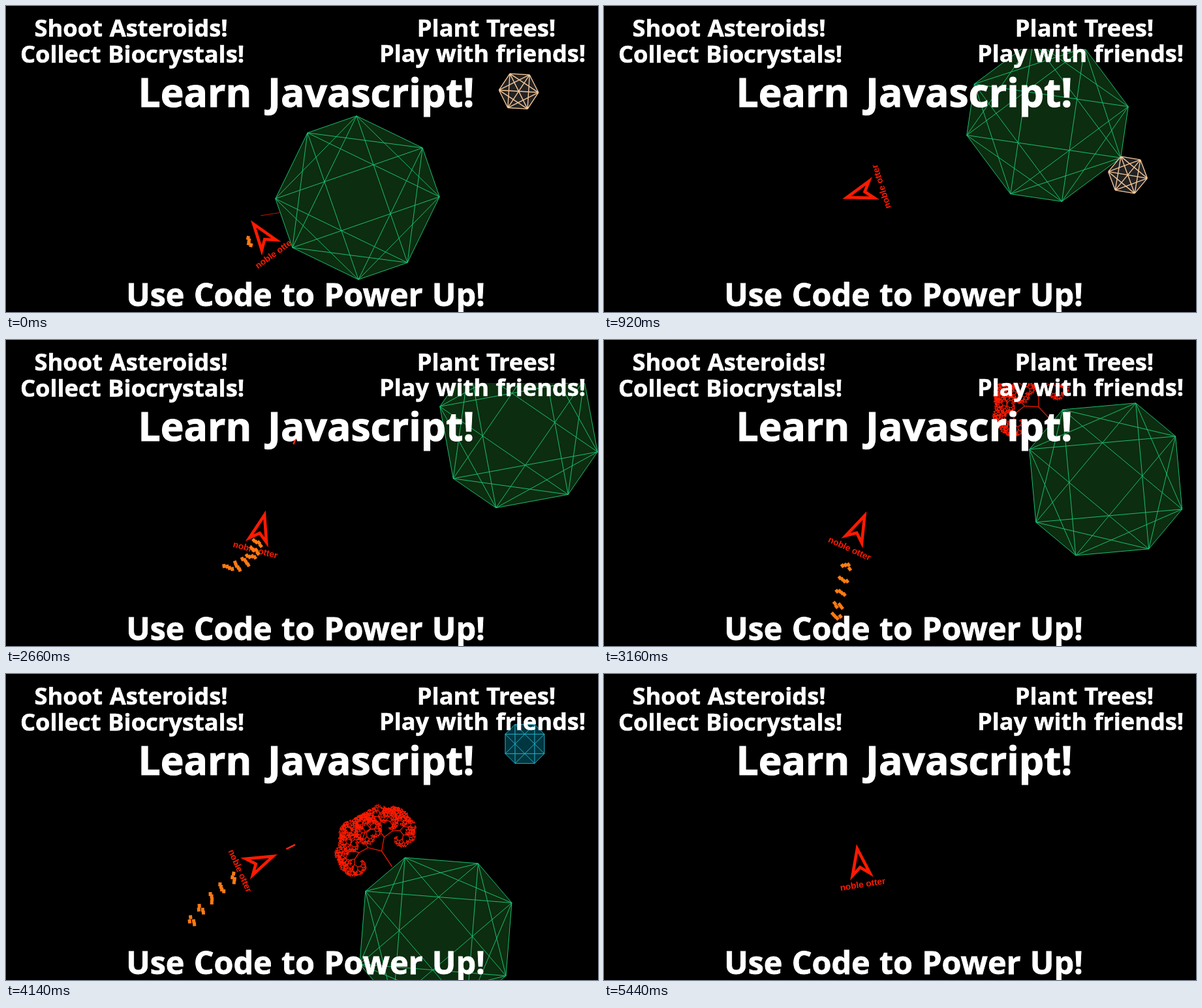
An HTML page with a canvas for the animation above (5460 ms loop, 907 px wide and 470 px high).

```html
<!DOCTYPE html>
<html lang="en">
<head>
<meta charset="utf-8">
<title>Space coding game</title>
<style>
  html, body { margin: 0; width: 100%; height: 100%; overflow: hidden; background: #000; }
  canvas { display: block; }
</style>
</head>
<body>
<canvas id="stage" width="907" height="470"></canvas>
<script>
const ctx = document.getElementById('stage').getContext('2d');
const LOOP = 5460, STEP = 20, TOP = 66, DEG = Math.PI / 180;
const RED = '#ff1a00', ORANGE = '#ff7a12';
const SHIP = { x: 391, y: 288 };
const TREE_FROM = 3080, ROCK_UNTIL = 2600, GEM_UNTIL = 5000;
const SHOTS = [2120, 2516, 4090];
const BURNS = [[2320, 3080], [3700, 4100], [4460, 4900]];

// Smooth, overshoot-free curve through a few points [time, ...values].
function curve(...rows) {
  const last = rows.length - 1;
  const slope = (i, k) => (rows[i + 1][k] - rows[i][k]) / (rows[i + 1][0] - rows[i][0]);
  function tangent(i, k) {
    if (i === 0) return slope(0, k);
    if (i === last) return slope(last - 1, k);
    const a = slope(i - 1, k), b = slope(i, k);
    return a * b <= 0 ? 0 : 2 * a * b / (a + b);
  }
  return t => {
    t = Math.min(Math.max(t, rows[0][0]), rows[last][0]);
    let i = 0;
    while (i < last - 1 && t > rows[i + 1][0]) i++;
    const p = rows[i], q = rows[i + 1], h = q[0] - p[0], u = (t - p[0]) / h, v = 1 - u;
    return p.slice(1).map((from, n) => {
      const k = n + 1;
      return from + (q[k] - from) * u * u * (3 - 2 * u)
        + h * u * v * (tangent(i, k) * v - tangent(i + 1, k) * u);
    });
  };
}

// The view follows the ship, so the planet's path carries everything else.
const path = curve([0, 538.5, 231.5], [920, 679.5, 176.5], [1800, 782.5, 116], [2660, 785.5, 137],
  [3720, 724.2, 334.6], [4580, 547.5, 451], [5040, 346, 482], [5440, 340, 692]);
const heading = curve([0, -36], [920, -107.6], [1800, -221.4], [2660, -345.4],
  [3720, -314.2], [4580, -279.7], [5440, -368.8]);
// The rock falls onto the planet, then rolls along its rim.
const rockOffset = curve([0, 247, -163.5], [560, 160, 0], [920, 123, 83], [1800, 90, 119]);

const settle = t => 63 * Math.max(0, 1 - t / 560) ** 2;
const turn = t => heading(t)[0] * DEG;
const planetSpin = t => -19.1 + 0.009 * t + 31.9 * (1 - Math.exp(-t / 1000));

function planetAt(t) {
  const [x, y] = path(t);
  return [x, y + settle(t)];
}

function noise(n) {
  const v = Math.sin(n * 127.1 + 3.7) * 43758.5453;
  return v - Math.floor(v);
}

// Polygon with chords joining corners the given numbers of steps apart.
function crystal(x, y, r, angles, steps, fill, line, width) {
  const points = angles.map(a => [x + r * Math.cos(a * DEG), y + r * Math.sin(a * DEG)]);
  ctx.beginPath();
  points.forEach(p => ctx.lineTo(...p));
  ctx.closePath();
  ctx.fillStyle = fill;
  ctx.fill();
  ctx.beginPath();
  points.forEach((p, i) => steps.forEach(d => {
    ctx.moveTo(...p);
    ctx.lineTo(...points[(i + d) % points.length]);
  }));
  ctx.strokeStyle = line;
  ctx.lineWidth = width;
  ctx.stroke();
}

const octagon = spin => [0, 90, 180, 270].flatMap(q => [spin + q - 18.435, spin + q + 18.435]);
const hexagon = spin => [0, 1, 2, 3, 4, 5].map(i => spin + i * 60);

function drawPlanet(t) {
  crystal(...planetAt(t), 125.7, octagon(planetSpin(t)), [1, 2, 3], '#0c2d0f', '#1bbd72', 1);
}

function drawRock(t) {
  const [px, py] = planetAt(t), [dx, dy] = rockOffset(t);
  crystal(px + dx, py + dy, 30.3, hexagon(3.4 + 0.0068 * t), [1, 2, 3], '#222', '#f5c69a', 1.4);
}

function drawGem(t) {
  const [px, py] = planetAt(t);
  crystal(px + 136.5, py - 278 - (4580 - t) * 0.03, 33.5, octagon(45), [1, 3], '#003640', '#22b4cc', 1);
}

// Binary tree growing along +x, with slightly uneven forks.
const treeShape = new Path2D();
function grow(x, y, len, dir, depth, id) {
  const ex = x + len * Math.cos(dir), ey = y + len * Math.sin(dir);
  treeShape.moveTo(x, y);
  treeShape.lineTo(ex, ey);
  if (depth === 0) return;
  for (const side of [0, 1]) {
    const child = id * 2 + side;
    const fork = (43 + (noise(child) - 0.5) * (depth > 9 ? 0 : 34)) * DEG;
    grow(ex, ey, len * 0.735, dir + (side ? fork : -fork), depth - 1, child);
  }
}
grow(0, 0, 29.3, 0, 11, 1);

function drawTree(t) {
  ctx.save();
  ctx.translate(...planetAt(t));
  ctx.rotate((planetSpin(t) - 172.7) * DEG);
  ctx.translate(122, 0);
  ctx.strokeStyle = RED;
  ctx.lineWidth = 1.2;
  ctx.stroke(treeShape);
  ctx.restore();
}

function drawShip(t) {
  ctx.save();
  ctx.translate(SHIP.x, SHIP.y + settle(t));
  ctx.rotate(turn(t));
  ctx.beginPath();
  [[0, -20], [13.5, 20], [0, 9], [-13.5, 20]].forEach(p => ctx.lineTo(...p));
  ctx.closePath();
  ctx.strokeStyle = RED;
  ctx.lineWidth = 4.6;
  ctx.stroke();
  ctx.fillStyle = RED;
  ctx.font = 'bold 13.6px "Liberation Sans", Arial, sans-serif';
  ctx.textAlign = 'center';
  ctx.fillText('noble otter', 0, 40);
  ctx.restore();
}

function puff(x, y, angle, seed) {
  ctx.save();
  ctx.translate(x, y);
  ctx.rotate(angle);
  ctx.fillStyle = ORANGE;
  for (let i = 0; i < 4; i++) {
    ctx.save();
    ctx.translate((i - 1.5) * 4, (noise(seed + i) - 0.5) * 7);
    ctx.rotate(0.6);
    ctx.fillRect(-3, -2.5, 6, 5);
    ctx.restore();
  }
  ctx.restore();
}

function drawExhaust(t) {
  const [px, py] = planetAt(t);
  for (const [from, to] of BURNS) {
    for (let born = from; born <= Math.min(to, t); born += 60) {
      const age = t - born;
      if (age > 360) continue;
      const [bx, by] = planetAt(born), a = turn(born), back = 16 + age * 0.16;
      puff(SHIP.x - Math.sin(a) * back + px - bx, SHIP.y + Math.cos(a) * back + py - by, a, born);
    }
  }
}

function line(x1, y1, x2, y2, color, width) {
  ctx.beginPath();
  ctx.moveTo(x1, y1);
  ctx.lineTo(x2, y2);
  ctx.strokeStyle = color;
  ctx.lineWidth = width;
  ctx.stroke();
}

function drawLasers(t) {
  for (const born of SHOTS) {
    const far = t - born + 8, a = turn(born);
    if (far < 30 || far > 490) continue;
    const at = d => [SHIP.x + Math.sin(a) * d, SHIP.y - Math.cos(a) * d];
    line(...at(far - 15), ...at(far), '#ff2a10', 2.4);
  }
}

// Last traces of a burn and a shot from before the loop begins.
function drawLeftovers(t) {
  puff(370 + t * 0.15, 363 - t * 0.25, 68 * DEG, 5);
  if (t < 60) line(390, 322, 419, 317.5, '#c01404', 1.2);
}

// Text, centre, baseline, size, extra word gap in em.
const TITLES = [
  ['Shoot Asteroids!', 191.5, 47, 36.3, 0.035],
  ['Collect Biocrystals!', 193.5, 87, 36.3, 0.035],
  ['Plant Trees!', 736, 47, 36.3, 0.035],
  ['Play with friends!', 730, 86, 36.1, 0.035],
  ['Learn Javascript!', 460, 155, 60.5, 0.15],
  ['Use Code to Power Up!', 459, 461, 48.4, 0.035]
];

function drawTitles() {
  ctx.fillStyle = ctx.strokeStyle = '#fff';
  ctx.textAlign = 'center';
  for (const [text, x, y, size, gap] of TITLES) {
    ctx.font = `bold ${size}px "Noto Sans", "Open Sans", sans-serif`;
    ctx.wordSpacing = `${size * gap}px`;
    ctx.lineWidth = size * 0.018;
    ctx.fillText(text, x, y);
    ctx.strokeText(text, x, y);
  }
  ctx.wordSpacing = '0px';
}

function draw(t) {
  ctx.fillStyle = '#000';
  ctx.fillRect(0, 0, 907, 470);
  ctx.save();
  ctx.beginPath();
  ctx.rect(0, TOP, 907, 470 - TOP);
  ctx.clip();
  drawShip(t);
  drawExhaust(t);
  if (t < 140) drawLeftovers(t);
  drawPlanet(t);
  if (t >= TREE_FROM) drawTree(t);
  if (t < ROCK_UNTIL) drawRock(t);
  else if (t >= 3600 && t < GEM_UNTIL) drawGem(t);
  drawLasers(t);
  ctx.restore();
  drawTitles();
}

const begin = performance.now();
function tick() {
  const t = (performance.now() - begin) % LOOP;
  draw(Math.floor(t / STEP) * STEP);
  requestAnimationFrame(tick);
}
tick();
</script>
</body>
</html>
```
